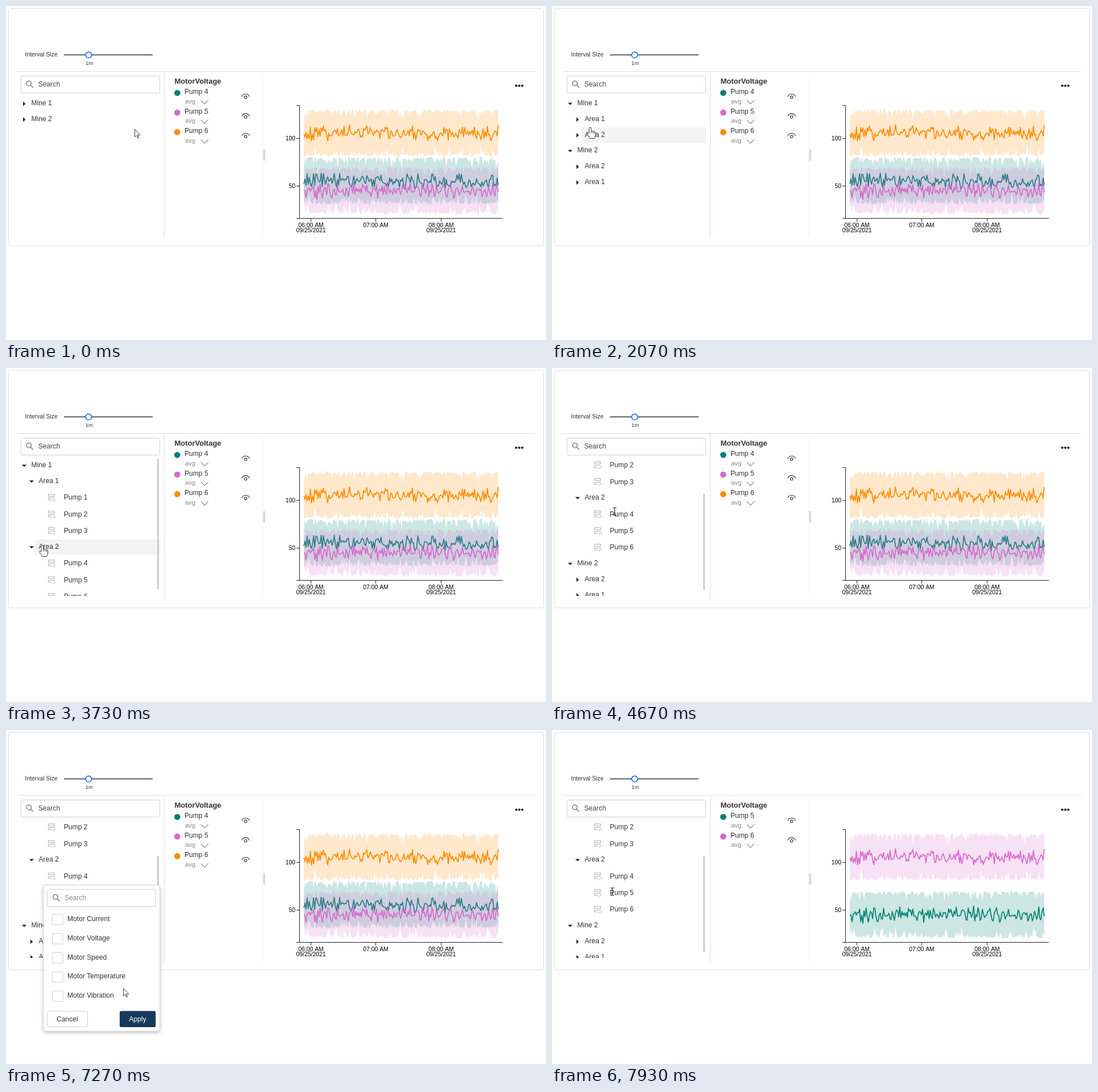
These frames come from a looping animation (950x589 px, 8000 ms). An HTML page with a canvas:

```html
<!DOCTYPE html>
<html>
<head>
<meta charset="utf-8">
<style>
html, body { margin: 0; width: 100%; height: 100%; overflow: hidden; background: #fff; }
canvas { display: block; }
</style>
</head>
<body>
<canvas id="stage" width="950" height="589"></canvas>
<script>
const c = document.getElementById('stage').getContext('2d');
const LOOP = 8000;
const COLORS = ['#008272', '#d869cb', '#ff8c00'];

// Moments when the interface changes, in ms
const OPEN = { mine1: 870, mine2: 1730, area1: 2530, area2: 3470 };
const SCROLL = 4670, POPUP = 5800, UNCHECK = 6470, APPLY = 6870, CLOSE = 7400;

// Pointer moves: begin, end, x, y
const MOVES = [
  [0, 530, 52, 166], [870, 1470, 64, 249], [1730, 2270, 68, 198], [2600, 2935, 85, 265],
  [2935, 3200, 64, 313], [4260, 4470, 110, 253], [4800, 5270, 135, 257],
  [5930, 6330, 90, 368], [6400, 6870, 226, 500], [7000, 7270, 206, 455], [7270, 7670, 106, 285]
];

function pointerAt(t) {
  let x = 226, y = 217;
  for (const [begin, end, toX, toY] of MOVES) {
    const k = Math.min(1, Math.max(0, (t - begin) / (end - begin)));
    const ease = k * k * (3 - 2 * k);
    x += (toX - x) * ease;
    y += (toY - y) * ease;
  }
  return [Math.round(x), Math.round(y)];
}

// Drawing helpers
function text(s, x, y, size = 12.1, color = '#333', align = 'left', weight = '') {
  c.font = `${weight} ${size}px "Liberation Sans", Arial, sans-serif`;
  c.fillStyle = color;
  c.textAlign = align;
  c.fillText(s, x, y);
}
function stroke(d, color, width = 1) {
  c.strokeStyle = color;
  c.lineWidth = width;
  c.stroke(new Path2D(d));
}
function dot(x, y, r, color) {
  c.fillStyle = color;
  c.beginPath();
  c.arc(x, y, r, 0, 7);
  c.fill();
}
function box(x, y, w, h, r, border, fill, width = 1) {
  c.beginPath();
  c.roundRect(x, y, w, h, r);
  if (fill) { c.fillStyle = fill; c.fill(); }
  if (border) { c.strokeStyle = border; c.lineWidth = width; c.stroke(); }
}
function glyph(x, y, draw) {
  c.save();
  c.translate(x, y);
  draw();
  c.restore();
}
function magnifier(x, y) {
  glyph(x, y, () => stroke('M3.2-1a4.2 4.2 0 1 1-8.4 0a4.2 4.2 0 1 1 8.4 0M2 2L6.5 6.5', '#808080', 1.6));
}

// Chart series: seeded noise around a mean, inside a ragged band
const COUNT = 180;
function makeSeries(name, seed, mean) {
  const rand = () => (seed = seed * 16807 % 2147483647) / 2147483647;
  const edge = () => 42 - Math.min(20, -4.6 * Math.log(rand()));
  const points = Array.from({ length: COUNT }, (_, i) => ({
    x: 524 + i * 342 / (COUNT - 1),
    y: mean + (rand() - rand()) * 16,
    top: mean - edge(),
    bottom: mean + edge()
  }));
  return { name, points };
}
const SERIES = [
  makeSeries('Pump 4', 42110471, 308),
  makeSeries('Pump 5', 91730263, 325.5),
  makeSeries('Pump 6', 63670519, 224)
];

function drawSeries({ points }, color) {
  c.beginPath();
  points.forEach(p => c.lineTo(p.x, p.top));
  [...points].reverse().forEach(p => c.lineTo(p.x, p.bottom));
  c.globalAlpha = 0.2;
  c.fillStyle = color;
  c.fill();
  c.globalAlpha = 1;
  c.beginPath();
  points.forEach(p => c.lineTo(p.x, p.y));
  c.strokeStyle = color;
  c.lineWidth = 1.7;
  c.lineJoin = 'round';
  c.stroke();
  c.lineJoin = 'miter';
}

function drawLegendItem(name, y, color) {
  dot(301.3, y, 5.4, color);
  text(name, 314, y + 1.9);
  text('avg', 315, y + 18.5, 11.3, '#888');
  glyph(349.3, y + 16, () => stroke('M-6.5-3.2L0 3.6L6.5-3.2', '#888', 1.1));
  glyph(421.6, y + 6.8, () =>
    stroke('M-6.8 0C-5-6.5 5-6.5 6.8 0M2.3.8a2.3 2.3 0 1 1-4.6 0a2.3 2.3 0 1 1 4.6 0', '#333', 1.1));
}

function drawChart(list) {
  text('MotorVoltage', 296.5, 136.5, 13, '#333', 'left', 'bold');
  list.forEach((s, i) => {
    drawSeries(s, COLORS[i]);
    drawLegendItem(s.name, 153.3 + i * 34.6, COLORS[i]);
  });
  stroke('M511 175.5H516.5V374.5M511 374.5H874', '#222');
  for (const value of [50, 100]) {
    const y = Math.round(401 - value * 1.68) + 0.5;
    stroke(`M511 ${y}H516`, '#222');
    text(value, 509, y + 3.2, 10.4, '#000', 'right');
  }
  for (let i = 0; i < 3; i++) {
    const x = 536.5 + Math.round(i * 114.4);
    stroke(`M${x} 375V380`, '#222');
    text(`0${6 + i}:00 AM`, x, 389.6, 10.4, '#000', 'center');
    if (i !== 1) text('09/25/2021', x, 399, 10.4, '#000', 'center');
  }
}

// Tree
function treeRows(t) {
  const rows = [];
  let y = 157.1 - (t >= SCROLL ? 86.6 : 0);
  const add = (label, level, open) => {
    const h = level === 2 ? 29.4 : 27.75;
    rows.push({ label, level, open, y, h });
    y += h;
  };
  const area = (n, open, first) => {
    add('Area ' + n, 1, open);
    if (open) for (let i = 0; i < 3; i++) add('Pump ' + (first + i), 2);
  };
  const isOpen = key => t >= OPEN[key];
  add('Mine 1', 0, isOpen('mine1'));
  if (isOpen('mine1')) {
    area(1, isOpen('area1'), 1);
    area(2, isOpen('area2'), 4);
  }
  add('Mine 2', 0, isOpen('mine2'));
  if (isOpen('mine2')) {
    area(2, false);
    area(1, false);
  }
  return rows;
}

function drawTree(rows, hovered, t) {
  c.save();
  c.beginPath();
  c.rect(20, 157, 252, 245);
  c.clip();
  for (const r of rows) {
    const mid = r.y + r.h / 2;
    if (r.level === 2) {
      glyph(80, mid + 1, () => stroke(
        'M-5.5-5.5H5.5V-2H-5.5ZM5.5 2.2V1H-5.5V4.5H0M1.5 4.5L4 6.8L8 2.8', '#aaa'));
      text(r.label, 101.8, mid + 5);
      continue;
    }
    const x = 32 + r.level * 13;
    if (r === hovered) {
      c.fillStyle = '#f3f3f3';
      c.fillRect(x + 7, r.y + 1.6, 232 - r.level * 13, 27);
    }
    c.fillStyle = '#222';
    glyph(x, mid + 1.5, () => c.fill(new Path2D(r.open ? 'M-4-2H4L0 2Z' : 'M-2-4L2.3 0L-2 4Z')));
    text(r.label, x + 12.4, mid + 4.2);
  }
  c.restore();
  if (t >= OPEN.area1) {
    c.fillStyle = '#ccc';
    c.fillRect(266, t >= SCROLL ? 222 : 160, 3, t >= 3930 ? 169 : 230);
  }
}

function drawFrame() {
  box(4.5, 4.5, 941, 418.5, 4, '#ddd');
  text('Interval Size', 33.5, 89.4, 10.4);
  stroke('M102 86.3H258', '#333', 1.5);
  box(140.2, 81.1, 10.4, 10.4, 5.2, '#1f72f2', '#fff', 1.7);
  text('1m', 146.4, 104, 9.5, '#333', 'center');
  stroke('M19 115.5H931M278.5 116V409', '#ddd');
  stroke('M451.5 118V408', '#f0f0f0');
  c.fillStyle = '#d8d8d8';
  c.fillRect(452.5, 252.5, 3.5, 20);
  box(26.5, 123.5, 244, 30, 2, '#d0d0d0');
  magnifier(41.3, 137.5);
  text('Search', 56.8, 142, 12.1, '#444');
  for (let i = 0; i < 3; i++) dot(897.7 + i * 5.3, 140.6, 2.1, '#222');
}

function drawPopup(t) {
  const focused = t < UNCHECK;
  c.save();
  c.shadowColor = 'rgba(0,0,0,.3)';
  c.shadowBlur = 7;
  c.shadowOffsetY = 2;
  box(66, 274, 204.5, 257, 3, null, '#fff');
  c.restore();
  box(66, 274, 204.5, 257, 3, '#ddd');
  box(73, 281, 190, 30.5, 2, focused ? '#337ab7' : '#ccc', null, focused ? 1.2 : 1);
  magnifier(88, 295.5);
  text('Search', 103, 300, 12.1, '#8a8a8a');
  if (focused) stroke('M103.5 289V302.5', '#222');
  ['Current', 'Voltage', 'Speed', 'Temperature', 'Vibration'].forEach((s, i) => {
    const y = 334.5 + i * 33.75;
    box(81.5, y - 9.5, 18.5, 18.5, 1, '#d0d0d0');
    text('Motor ' + s, 108, y + 2.5);
    if (i === 1 && focused) glyph(90.7, y, () => stroke('M-5.5.5L-1.8 4L5.7-4', '#337ab7', 1.8));
  });
  box(73, 496, 70.5, 27.5, 2.5, '#d0d0d0');
  text('Cancel', 89, 514);
  box(200, 495.5, 63.3, 28.5, 2.5, null, t >= APPLY ? '#183a5a' : '#337ab7');
  text('Apply', 216.5, 514, 12.1, '#fff');
}

// Pointers
const ARROW = 'M.5.5V14L3.6 11.1L5.8 16L7.7 15.2L5.6 10.4H9.8Z';
const HAND = 'M-1.8 11V1.8a1.8 1.8 0 0 1 3.6 0V7a1.6 1.6 0 0 1 3 .6a1.5 1.5 0 0 1 2.8.7' +
  'a1.3 1.3 0 0 1 1.9 1.2V13c0 2-1.2 3.2-1.6 6.5H-.5c-.5-3-2.5-4.5-4.3-7.6c-1-2 1.2-2.8 2-1.6Z';

function drawPointer(kind, x, y) {
  glyph(x, y, () => {
    if (kind === 'beam') {
      stroke('M-2.8-6.5H-.8L.2-5.7L1.2-6.5H3.2M.2-6V6M-2.8 6.5H-.8L.2 5.7L1.2 6.5H3.2', '#111', 1.1);
      return;
    }
    const shape = kind === 'hand' ? HAND : ARROW;
    c.fillStyle = '#fff';
    c.fill(new Path2D(shape));
    stroke(shape, '#222', 0.9);
    if (kind === 'hand') stroke('M1.8 7V10.5M4.8 7.6V10.5M7.6 8.3V11', '#222', 0.9);
  });
}

function pointerKind(x, y, row, popup) {
  if (popup && y > 274) {
    const onBox = x > 81 && x < 100 && y > 325;
    const onApply = x > 200 && x < 263 && y > 496;
    return onBox || onApply ? 'hand' : 'arrow';
  }
  if (!row) return 'arrow';
  if (row.level < 2 || x <= 100) return 'hand';
  return x < 160 ? 'beam' : 'arrow';
}

function draw(now) {
  // The screen advances 15 times a second
  const t = Math.floor((now % LOOP + 4) * 0.015) / 0.015 + 4;
  const popup = t >= POPUP && t < CLOSE;
  const [x, y] = pointerAt(t);
  const rows = treeRows(t);
  const row = x > 26 && x < 271 && y > 157 && y < 402
    ? rows.find(r => y >= r.y && y < r.y + r.h) : null;

  c.fillStyle = '#fff';
  c.fillRect(0, 0, 950, 589);
  drawFrame();
  drawTree(rows, popup ? null : row, t);
  drawChart(t >= CLOSE ? SERIES.slice(1) : SERIES);
  if (popup) drawPopup(t);
  drawPointer(pointerKind(x, y, row, popup), x, y);
}

const start = performance.now();
function tick() {
  draw(performance.now() - start);
  requestAnimationFrame(tick);
}
tick();
</script>
</body>
</html>
```
